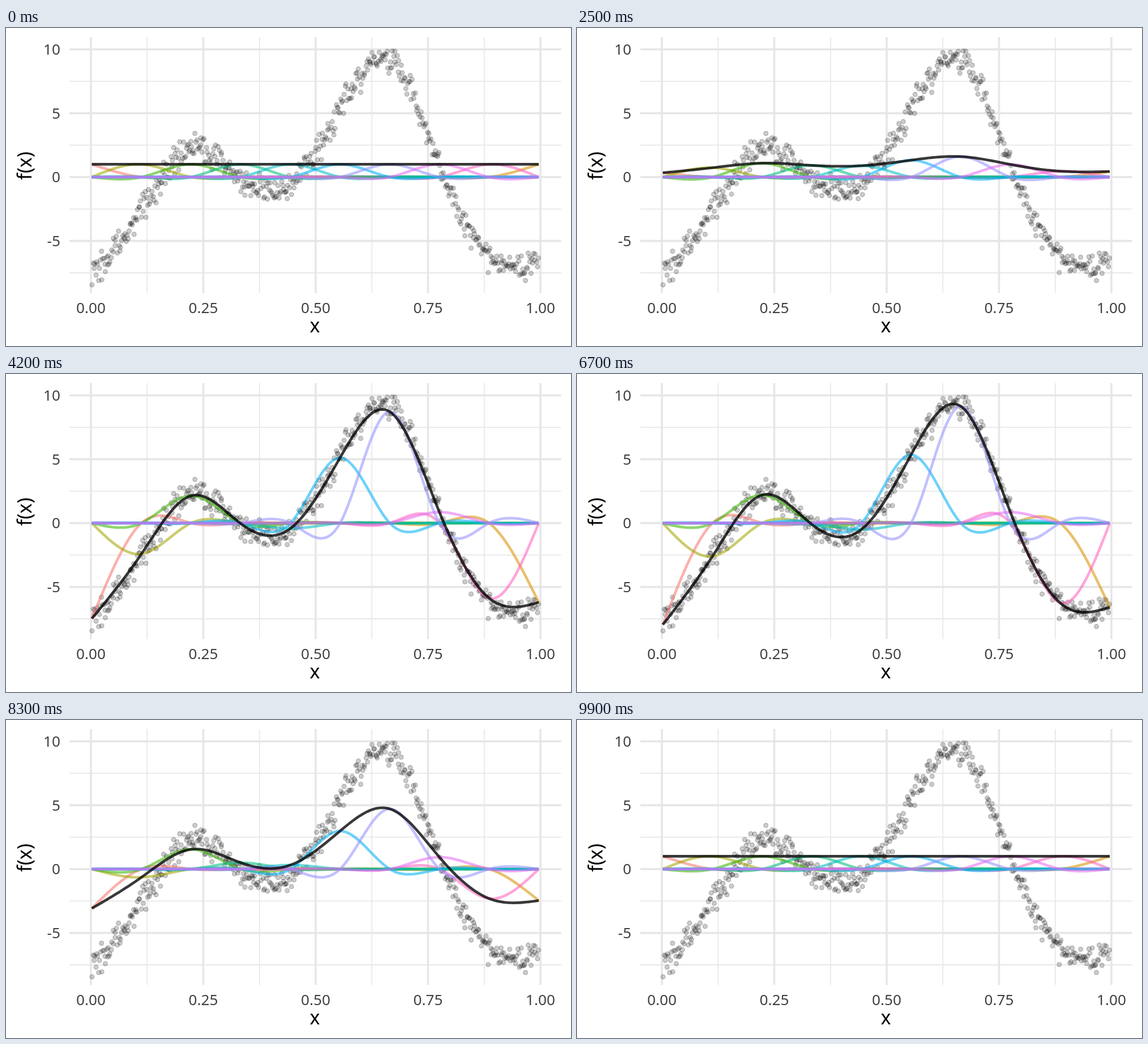
These frames come from a looping animation (998x561 px, 10 s). An HTML page:

```html
<!DOCTYPE html>
<html lang="en">
<head>
<meta charset="utf-8">
<title>Spline basis</title>
<style>
  html, body { margin: 0; width: 100%; height: 100%; overflow: hidden; background: #fff; }
  svg { display: block; width: 100vw; height: 100vh; }
  text { font-family: "Noto Sans", "Open Sans", sans-serif; }
  .tick { font-size: 26.2px; fill: #404040; }
  .title { font-size: 34px; fill: #000; text-anchor: middle; }
  .major { stroke: #e6e6e6; stroke-width: 3.6; }
  .minor { stroke: #e8e8e8; stroke-width: 1.8; }
  .dots { fill: #000; fill-opacity: .2; stroke: #000; stroke-opacity: .22; stroke-width: 1.3; }
  .basis { fill: none; stroke-width: 4.7; stroke-opacity: .57; }
  .sum { fill: none; stroke: #000; stroke-width: 4.7; stroke-opacity: .78; }
</style>
</head>
<body>
<svg id="plot" viewBox="0 0 998 561"></svg>
<script>
const svg = document.getElementById('plot');
const px = x => 150 + 794 * x;
const py = y => 263 - 22.53 * y;

function add(tag, attrs, parent = svg) {
  const el = document.createElementNS('http://www.w3.org/2000/svg', tag);
  for (const k in attrs) el.setAttribute(k, attrs[k]);
  parent.appendChild(el);
  return el;
}

function label(text, x, y, attrs) {
  add('text', { x, y, ...attrs }).textContent = text;
}

// Grid and axes
const vline = (x, cls) => add('line', { x1: px(x), x2: px(x), y1: 16, y2: 467.5, class: cls });
const hline = (y, cls) => add('line', { x1: 112, x2: 980.5, y1: py(y), y2: py(y), class: cls });
for (let i = 0; i < 4; i++) {
  vline(.125 + i / 4, 'minor');
  hline(7.5 - 5 * i, 'minor');
}
for (let i = 0; i < 5; i++) {
  const x = i / 4;
  vline(x, 'major');
  label(x.toFixed(2), px(x), 503, { class: 'tick', 'text-anchor': 'middle' });
}
for (let y = -5; y <= 10; y += 5) {
  hline(y, 'major');
  label(y, 96, py(y) + 9.3, { class: 'tick', 'text-anchor': 'end' });
}
label('x', 545.5, 536.5, { class: 'title' });
label('f(x)', 0, 0, { class: 'title', transform: 'translate(45 243) rotate(-90)' });

// Natural cubic spline basis on evenly spaced knots; u runs from 0 to 1
const KNOTS = 10, STEPS = 180, LEFT = .002, RIGHT = .9962;
const weights = [-7.95, -2.6, 2.2, -.1, -.5, 5.35, 9.15, .85, -6.25, -6.6];
const colors = ['#F8766D', '#A3A500', '#39B600', '#00BF7D', '#00BFC4',
  '#00B0F6', '#9590FF', '#E76BF3', '#FF62BC', '#D89000'];
const stack = [0, 9, 1, 2, 8, 3, 4, 5, 6, 7];
const xAt = u => px(LEFT + (RIGHT - LEFT) * u);

function cardinal(k) {
  const y = Array(KNOTS).fill(0), m = Array(KNOTS).fill(0);
  y[k] = 1;
  for (let pass = 0; pass < 40; pass++) {
    for (let i = 1; i < KNOTS - 1; i++) {
      m[i] = (6 * (y[i - 1] - 2 * y[i] + y[i + 1]) - m[i - 1] - m[i + 1]) / 4;
    }
  }
  return u => {
    const pos = u * (KNOTS - 1);
    const i = Math.min(KNOTS - 2, Math.floor(pos));
    const b = pos - i, a = 1 - b;
    return a * y[i] + b * y[i + 1] + ((a ** 3 - a) * m[i] + (b ** 3 - b) * m[i + 1]) / 6;
  };
}

const basis = weights.map((_, k) => cardinal(k));
const fit = u => weights.reduce((sum, w, k) => sum + w * basis[k](u), 0);

// Scatter: noise around the fitted curve
const DOTS = 500, SPREAD = 1.05;
let seed = 20;
function random() {
  seed = (seed * 1664525 + 1013904223) % 4294967296;
  return seed / 4294967296;
}

const dots = add('g', { class: 'dots' });
for (let i = 0; i < DOTS; i++) {
  const u = (i + random()) / DOTS;
  const noise = (random() + random() + random() - 1.5) * SPREAD;
  add('circle', { cx: xAt(u), cy: py(fit(u) + noise), r: 3.9 }, dots);
}

// Curves
const samples = basis.map(f => Array.from({ length: STEPS + 1 }, (_, s) => f(s / STEPS)));
const lines = [];
stack.forEach(k => { lines[k] = add('path', { class: 'basis', stroke: colors[k] }); });
const total = add('path', { class: 'sum' });

function trace(path, values) {
  path.setAttribute('d', 'M' + values.map((v, s) =>
    xAt(s / STEPS).toFixed(2) + ' ' + py(v).toFixed(2)).join('L'));
}

const clamp = u => Math.min(1, Math.max(0, u));
const ease = u => u < .5 ? 4 * u ** 3 : 1 - 4 * (1 - u) ** 3;

function progress(t) {
  return t < 6000 ? ease(clamp((t - 1600) / 3400)) : 1 - ease(clamp((t - 6600) / 3300));
}

let shown = -1;
function draw(now) {
  const t = Math.floor(((now + 2) % 10000) / 100) * 100;
  if (t === shown) return;
  shown = t;
  const p = progress(t);
  const sum = Array(STEPS + 1).fill(0);
  weights.forEach((w, k) => {
    const scale = 1 + (w - 1) * p;
    const values = samples[k].map(v => v * scale);
    values.forEach((v, s) => { sum[s] += v; });
    trace(lines[k], values);
  });
  trace(total, sum);
}

function tick() {
  draw(performance.now());
  requestAnimationFrame(tick);
}
tick();
</script>
</body>
</html>
```
